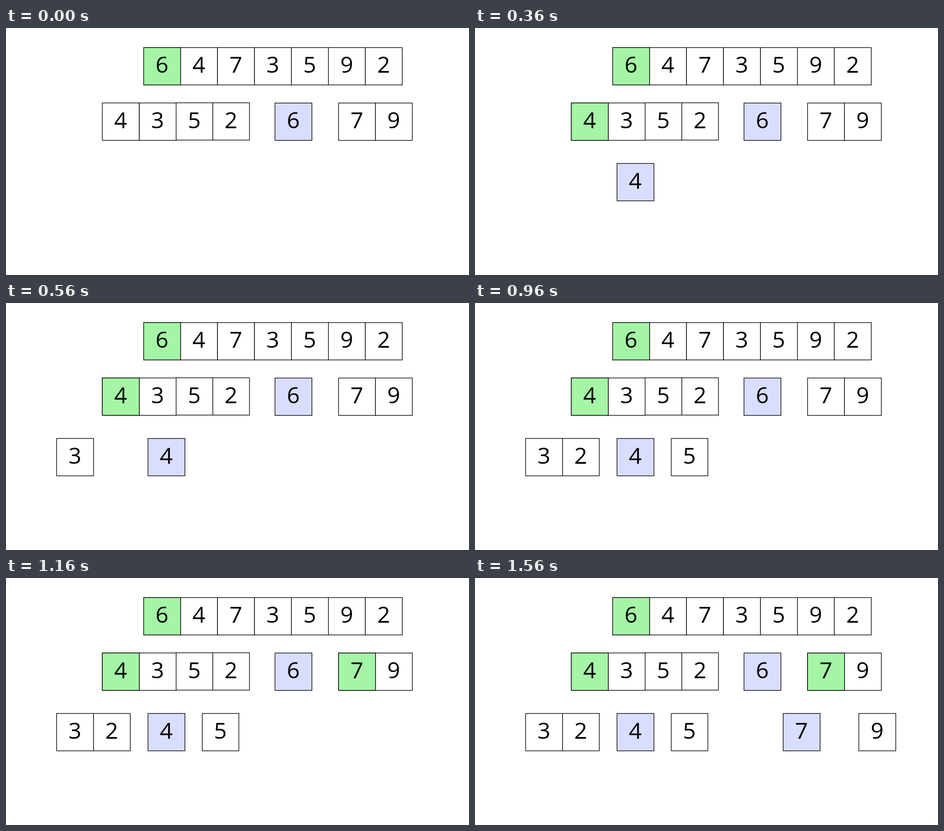
An HTML page that plays this animation: 1025x547 px, repeating every 1.6 s.

```html
<!DOCTYPE html>
<html lang="en">
<head>
<meta charset="utf-8">
<title>Quicksort partitions</title>
<style>
  html, body { margin: 0; width: 100%; height: 100%; overflow: hidden; background: #fff; }
  svg { display: block; }
  rect { stroke: #000; stroke-width: 1.4; }
  text { font: 50px "Open Sans", "Noto Sans", sans-serif; text-anchor: middle; }
</style>
</head>
<body>
<svg id="stage" width="1025" height="547" viewBox="0 0 1025 547"></svg>
<script>
const LOOP = 1600, SIZE = 81.8;
const WHITE = '#fff', GREEN = '#a5f5a6', BLUE = '#d9ddff';
const stage = document.getElementById('stage');
const timed = [];

function add(parent, tag, attrs) {
  const el = document.createElementNS('http://www.w3.org/2000/svg', tag);
  for (const name in attrs) el.setAttribute(name, attrs[name]);
  return parent.appendChild(el);
}

function cell(x, y, digit, fill = WHITE, start = 0, width = SIZE) {
  const group = add(stage, 'g', {});
  add(group, 'rect', { x, y, width, height: 82.7, fill });
  add(group, 'text', { x: x + width / 2 - 0.4, y: y + 56 }).textContent = digit;
  if (start) timed.push({ group, start });
}

function row(x, y, digits, width) {
  [...digits].forEach((digit, i) => cell(x + i * width, y, digit, WHITE, 0, width));
}

row(304.7, 43.4, '6473592', SIZE);
cell(304.7, 43.4, 6, GREEN);

row(213.3, 166, '43', SIZE);
row(376.6, 165.6, '52', 81.2);
cell(595.5, 166.2, 6, BLUE);
row(736.3, 166.2, '79', 81.6);

cell(213.3, 166, 4, GREEN, 160);
cell(314.4, 300, 4, BLUE, 360);
cell(112, 300, 3, WHITE, 560);
cell(434.5, 300, 5, WHITE, 760, 81);
cell(193.8, 300, 2, WHITE, 960, 81.4);
cell(736.3, 166.2, 7, GREEN, 1160);
cell(682.2, 300, 7, BLUE, 1360);
cell(849.7, 300, 9, WHITE, 1560);

function draw() {
  const time = performance.now() % LOOP;
  for (const { group, start } of timed) {
    group.style.display = time >= start ? '' : 'none';
  }
  requestAnimationFrame(draw);
}
draw();
</script>
</body>
</html>
```
